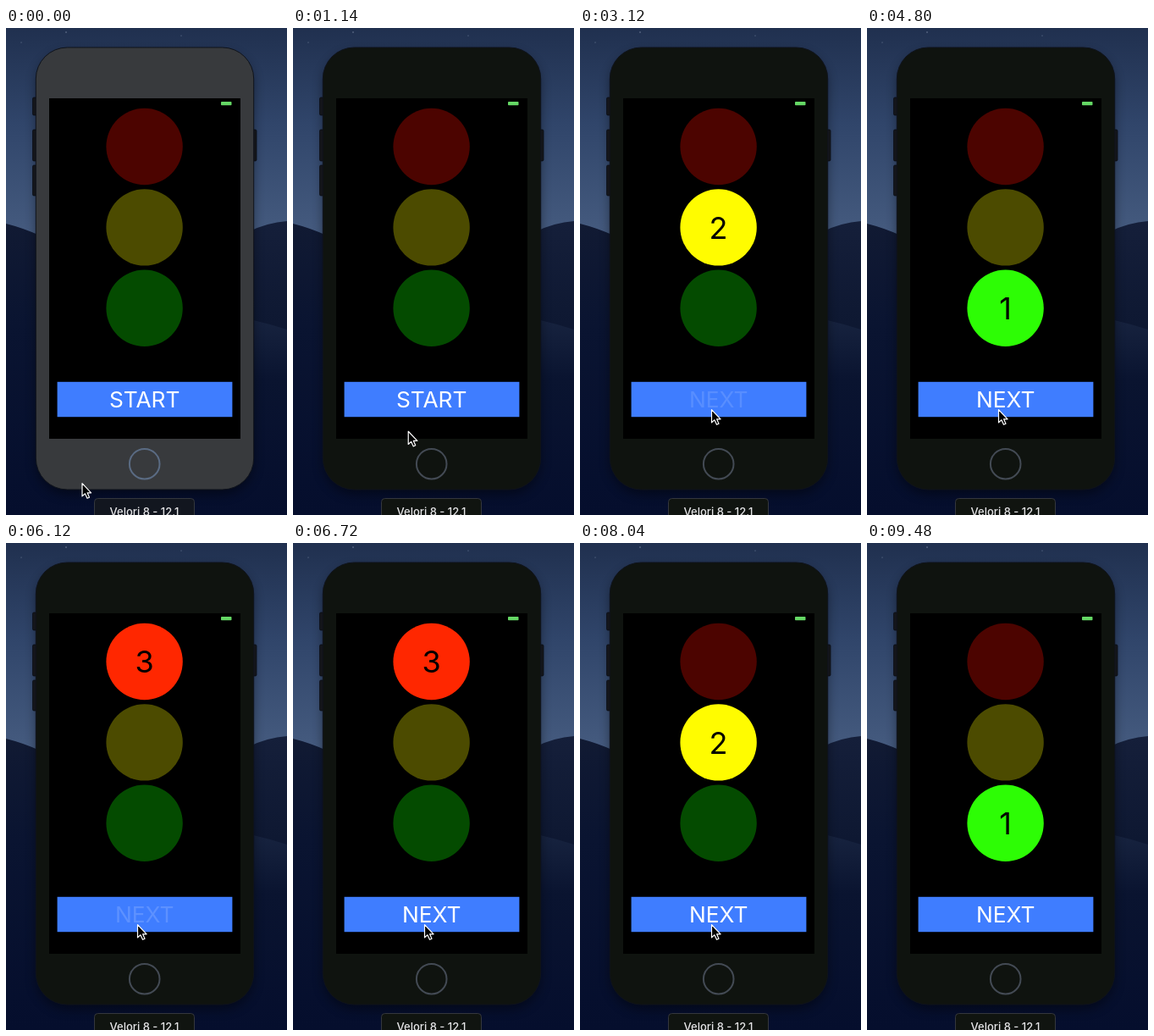
Animation, 332 px wide and 575 px high, one loop 9540 ms. Source, as an HTML page:

```html
<!DOCTYPE html>
<html lang="en">
<head>
<meta charset="utf-8">
<title>Traffic light</title>
<style>
  html, body { margin: 0; width: 100%; height: 100%; overflow: hidden; background: #070e22; }
  svg { display: block; width: 100%; height: 100%; }
  text { font-family: Inter, Roboto, sans-serif; text-anchor: middle; }
</style>
</head>
<body>
<svg viewBox="0 0 332 575" xmlns="http://www.w3.org/2000/svg">
  <defs>
    <linearGradient id="sky" x2="0" y2="1">
      <stop offset="0" stop-color="#20304f"/>
      <stop offset=".45" stop-color="#30456a"/>
      <stop offset="1" stop-color="#465c80"/>
    </linearGradient>
    <linearGradient id="left" x2="0" y2="1">
      <stop offset="0" stop-color="#111a33"/>
      <stop offset=".35" stop-color="#0a1431"/>
      <stop offset="1" stop-color="#050e2d"/>
    </linearGradient>
    <linearGradient id="right" x2="0" y2="1">
      <stop offset="0" stop-color="#151f3a"/>
      <stop offset=".35" stop-color="#0e1832"/>
      <stop offset="1" stop-color="#0a132c"/>
    </linearGradient>
    <linearGradient id="sand" x2="0" y2="1">
      <stop offset="0" stop-color="#17233f"/>
      <stop offset=".3" stop-color="#0a1430"/>
      <stop offset="1" stop-color="#050e2d"/>
    </linearGradient>
    <filter id="blur" x="-20%" y="-20%" width="140%" height="140%">
      <feGaussianBlur stdDeviation="7"/>
    </filter>
  </defs>

  <rect width="332" height="250" fill="url(#sky)"/>
  <g fill="#8390ab">
    <circle cx="71" cy="5" r=".7"/>
    <circle cx="18" cy="17" r=".5"/>
    <circle cx="207" cy="9" r=".5"/>
  </g>
  <path d="M0 231Q20 236 40 245H170V575H0Z" fill="url(#left)"/>
  <path d="M170 240H288Q308 230 332 228V575H170Z" fill="url(#right)"/>
  <path d="M170 344H288Q310 349 332 356V575H170Z" fill="url(#sand)"/>

  <rect x="36" y="30" width="256" height="520" rx="37" opacity=".45" filter="url(#blur)"/>
  <g fill="#14161b" stroke="#080a10" stroke-width=".7">
    <rect x="31.5" y="82" width="6" height="21" rx="1.5"/>
    <rect x="31.5" y="120" width="6" height="37" rx="1.5"/>
    <rect x="31.5" y="162" width="6" height="36" rx="1.5"/>
    <rect x="290" y="120" width="6" height="37" rx="1.5"/>
  </g>
  <rect id="body" x="35.3" y="23" width="257.4" height="522" rx="37" stroke="#0f131b"/>
  <rect x="51" y="83" width="226" height="402"/>
  <circle id="home" cx="163.7" cy="514.7" r="17.8" fill="none" stroke-width="2"/>
  <rect x="254" y="87" width="12.5" height="4.3" rx=".8" fill="#65d865"/>

  <g id="lamps" font-size="36"></g>

  <rect x="60.6" y="417.8" width="206.8" height="41.4" fill="#3f7dff"/>
  <text id="title" x="163.7" y="448.3" font-size="26.3" fill="#fff"></text>

  <rect id="tag" x="104.5" y="555.5" width="118" height="30" rx="4" stroke="#34373d"/>
  <text x="163.5" y="576" font-size="13" font-weight="500" fill="#e6e6e8">Velori 8 - 12.1</text>

  <path id="cursor" d="M0 0V15.2L3.4 12.1L6 17.6L8.5 16.5L6.1 11.1H10.6Z" fill="#000" stroke="#fff" stroke-width="1.2" stroke-linejoin="round"/>
</svg>

<script>
const LOOP = 9540;
const FOCUS = 300;
const HOLD = 100;
const FADE = 320;
const DIM = 0.09;
// Moments at which the button is released.
const taps = [1980, 3080, 4420, 6070, 7380, 8540];
const lamps = [
  { y: 140, off: '#4c0400', on: '#ff2700', digit: 3 },
  { y: 235.4, off: '#4c4b00', on: '#fffc00', digit: 2 },
  { y: 330.8, off: '#044b00', on: '#2dfd05', digit: 1 }
];
// Pointer stops: time, x, y.
const route = [
  [0, 90, 537.7], [500, 90, 537.7], [1500, 155.5, 450.7],
  [8900, 155.5, 450.7], [9400, 318, -24], [LOOP, 318, -24]
];

const $ = id => document.getElementById(id);
const body = $('body'), home = $('home'), tag = $('tag'), title = $('title'), cursor = $('cursor');

function add(parent, name, attrs) {
  const node = document.createElementNS('http://www.w3.org/2000/svg', name);
  for (const key in attrs) node.setAttribute(key, attrs[key]);
  return parent.appendChild(node);
}

for (const lamp of lamps) {
  lamp.disc = add($('lamps'), 'circle', { cx: 163.6, cy: lamp.y, r: 45.2 });
  lamp.label = add($('lamps'), 'text', { x: 163.6, y: lamp.y + 13.3, fill: '#000' });
  lamp.label.textContent = lamp.digit;
}

const clamp = v => Math.min(1, Math.max(0, v));
const ease = v => v * v * (3 - 2 * v);

function pointerAt(t) {
  const i = Math.max(1, route.findIndex(stop => stop[0] > t));
  const [t0, x0, y0] = route[i - 1];
  const [t1, x1, y1] = route[i];
  const k = ease(clamp((t - t0) / (t1 - t0)));
  return [x0 + (x1 - x0) * k, y0 + (y1 - y0) * k];
}

function titleAlpha(t) {
  for (const tap of taps) {
    if (t >= tap - HOLD && t < tap) return DIM;
    if (t >= tap && t < tap + FADE) return DIM + (1 - DIM) * ease((t - tap) / FADE);
  }
  return 1;
}

function draw(t) {
  const focused = t >= FOCUS;
  body.setAttribute('fill', focused ? '#0f130f' : '#383a3d');
  home.setAttribute('stroke', focused ? '#434a54' : '#5a6b83');
  tag.setAttribute('fill', focused ? '#101410' : '#12161f');

  const count = taps.filter(tap => t >= tap).length;
  const active = count ? (count - 1) % 3 : -1;
  lamps.forEach((lamp, i) => {
    lamp.disc.setAttribute('fill', i === active ? lamp.on : lamp.off);
    lamp.label.setAttribute('visibility', i === active ? 'visible' : 'hidden');
  });

  title.textContent = count ? 'NEXT' : 'START';
  title.setAttribute('opacity', titleAlpha(t));
  cursor.setAttribute('transform', `translate(${pointerAt(t)})`);
}

const start = performance.now();
function tick() {
  draw((performance.now() - start) % LOOP);
  requestAnimationFrame(tick);
}
tick();
</script>
</body>
</html>
```
